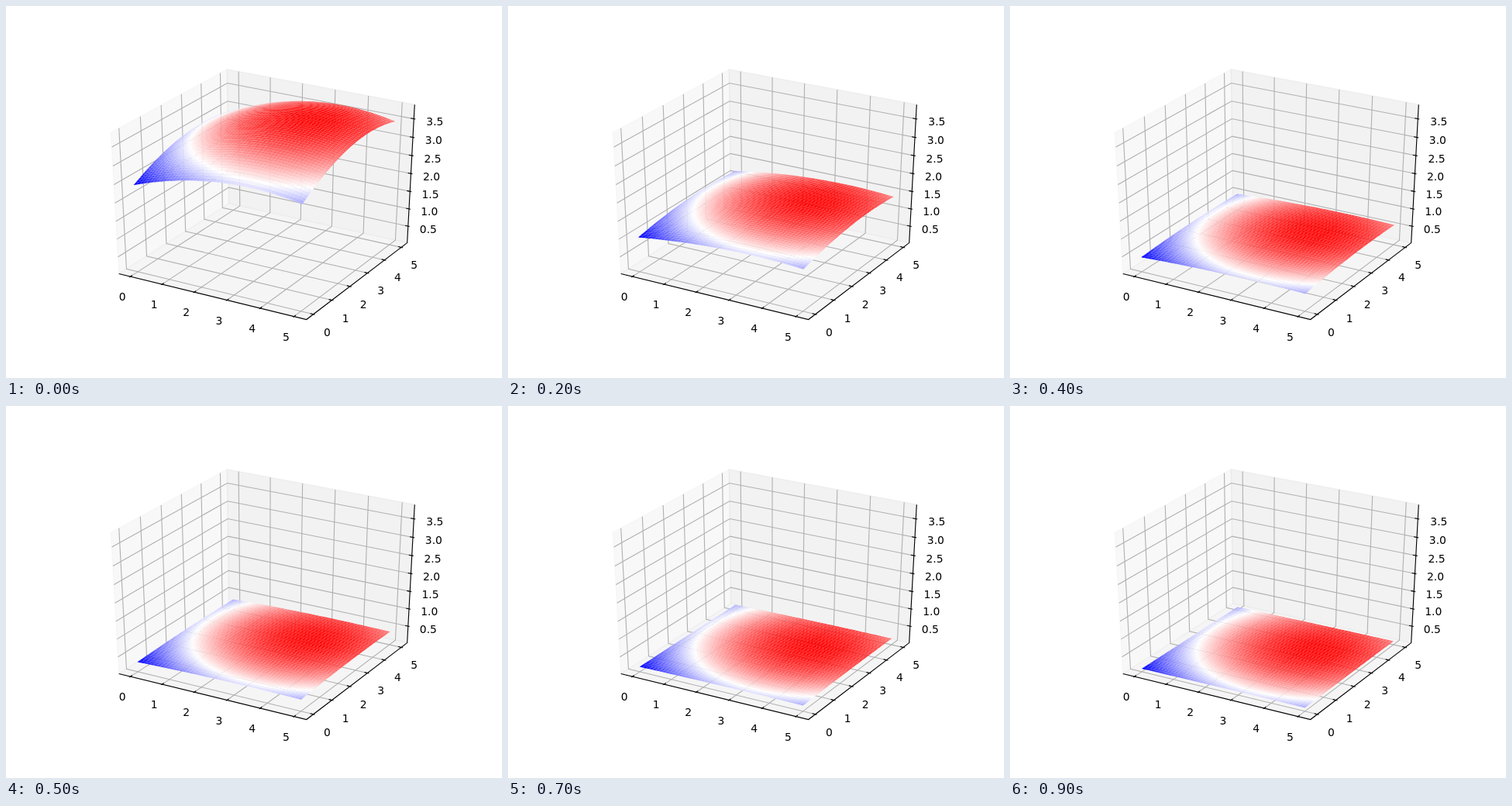
An HTML page with a canvas that plays this animation: 640 px wide and 480 px high, repeating every 1000 ms.

```html
<!DOCTYPE html>
<html lang="en">
<head>
<meta charset="utf-8">
<title>Decaying surface</title>
<style>
  html, body { margin: 0; width: 100%; height: 100%; overflow: hidden; background: #fff; }
  svg, canvas { position: absolute; left: 0; top: 0; width: 640px; height: 480px; }
  text { font: 13.89px "DejaVu Sans", sans-serif; text-anchor: middle; }
</style>
</head>
<body>
<svg id="axes" viewBox="0 0 640 480"></svg>
<canvas id="surface" width="640" height="480"></canvas>
<script>
const STEP = 100, STEPS = 10, DECAY = 0.625;
const CELLS = 50, SIZE = 5;
const Z_MIN = 0.092, Z_MAX = 3.803;

// Perspective camera: elevation 30, azimuth -60, distance 10, unit cube at the origin.
const S3 = Math.sqrt(3);
function project(u, v, w) {
  const right = u * S3 / 2 + v / 2;
  const up = -u / 4 + v * S3 / 4 + w * S3 / 2;
  const dist = 10 - (u * S3 / 4 - v * 0.75 + w / 2);
  return [
    80 + (right / dist + 0.095) / 0.185 * 496,
    427.2 - (up / dist + 0.095) / 0.185 * 369.6
  ];
}
const flat = n => (n + 0.25) / 5.5 - 0.5;
const tall = z => (z - Z_MIN) / (Z_MAX - Z_MIN) - 0.5;

// Axes box
const svg = document.getElementById('axes');
const E = 0.5 + 1 / 48, OUT = 0.1 / 12, IN = 0.2 / 12, PAD = 0.075;

function add(tag, attrs, text) {
  const el = document.createElementNS('http://www.w3.org/2000/svg', tag);
  for (const key in attrs) el.setAttribute(key, attrs[key]);
  if (text) el.textContent = text;
  svg.appendChild(el);
}
const points = list =>
  list.map(p => project(...p).map(n => n.toFixed(2)).join()).join(' ');

function pane(color, ...list) {
  add('polygon', { points: points(list), fill: color, stroke: color,
    'stroke-width': 1.39, 'fill-opacity': 0.5, 'stroke-opacity': 0.5 });
}
function line(color, ...list) {
  add('polyline', { points: points(list), fill: 'none', stroke: color, 'stroke-width': 1.11 });
}
function label(text, ...at) {
  const [x, y] = project(...at);
  add('text', { x: x.toFixed(1), y: Math.round(y + 11.2) }, text);
}

pane('#f2f2f2', [-E, -E, -E], [-E, E, -E], [-E, E, E], [-E, -E, E]);
pane('#e6e6e6', [-E, E, -E], [E, E, -E], [E, E, E], [-E, E, E]);
pane('#ececec', [-E, -E, -E], [E, -E, -E], [E, E, -E], [-E, E, -E]);

const GRID = '#b0b0b0', INK = '#000';
const flatTicks = [0, 1, 2, 3, 4, 5];
const tallTicks = [0.5, 1, 1.5, 2, 2.5, 3, 3.5];

for (const n of flatTicks) {
  const c = flat(n);
  line(GRID, [c, -E, -E], [c, E, -E], [c, E, E]);
  line(GRID, [E, c, -E], [-E, c, -E], [-E, c, E]);
}
for (const z of tallTicks) {
  const c = tall(z);
  line(GRID, [-E, -E, c], [-E, E, c], [E, E, c]);
}
line(INK, [-E, -E, -E], [E, -E, -E], [E, E, -E], [E, E, E]);
for (const n of flatTicks) {
  const c = flat(n);
  line(INK, [c, -E - OUT, -E], [c, -E + IN, -E]);
  line(INK, [E + OUT, c, -E], [E - IN, c, -E]);
  label(String(n), c, -E - PAD, -E - PAD);
  label(String(n), E + PAD, c, -E - PAD);
}
for (const z of tallTicks) {
  const c = tall(z);
  line(INK, [E + OUT, E, c], [E - IN, E, c]);
  label(z.toFixed(1), E + PAD, E + PAD, c);
}

// Surface: one product-of-cosines bump whose height decays step by step.
const ctx = document.getElementById('surface').getContext('2d');
const wave = n => Math.cos(0.19 * (n - 3.42));
const bump = (x, y) => wave(x) * wave(y);
const at = i => i * SIZE / CELLS;

function blueWhiteRed(t) {
  const c = Math.round(255 * (1 - Math.abs(2 * t - 1)));
  return t < 0.5 ? `rgb(${c},${c},255)` : `rgb(255,${c},${c})`;
}

// Cells in back-to-front order.
const cells = [];
for (let j = CELLS - 1; j >= 0; j--) {
  for (let i = 0; i < CELLS; i++) {
    const corners = [[i, j], [i + 1, j], [i + 1, j + 1], [i, j + 1]].map(([a, b]) => {
      const x = at(a), y = at(b);
      return [flat(x), flat(y), bump(x, y)];
    });
    const mean = corners.reduce((sum, p) => sum + p[2], 0) / 4;
    cells.push({ corners, mean });
  }
}
const means = cells.map(c => c.mean);
const low = Math.min(...means), high = Math.max(...means);
for (const c of cells) c.color = blueWhiteRed((c.mean - low) / (high - low));

function draw(step) {
  const scale = 1.0063 * Math.pow(DECAY, step);
  ctx.clearRect(0, 0, 640, 480);
  for (const { corners, color } of cells) {
    ctx.beginPath();
    for (const [u, v, h] of corners) {
      ctx.lineTo(...project(u, v, h * scale - 0.5063));
    }
    ctx.closePath();
    ctx.fillStyle = color;
    ctx.fill();
  }
}

let shown = 0;
draw(0);
const start = performance.now();
function tick() {
  const step = Math.floor(Math.max(0, performance.now() - start) / STEP) % STEPS;
  if (step !== shown) draw(shown = step);
  requestAnimationFrame(tick);
}
requestAnimationFrame(tick);
</script>
</body>
</html>
```
